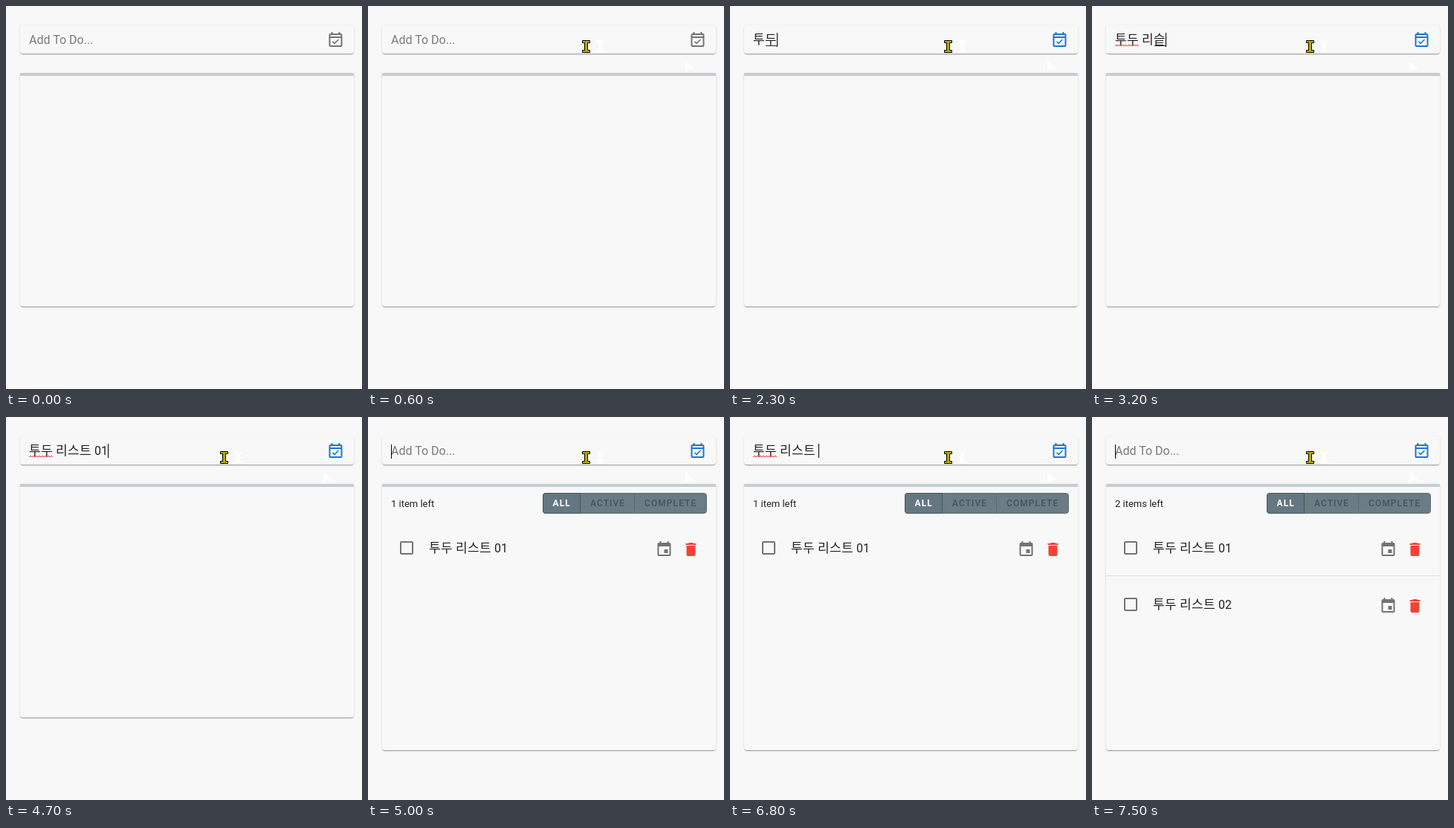
Animation, 479 px wide and 515 px high, one loop 8 s. Source, as an HTML page:

```html
<!DOCTYPE html>
<html lang="ko">
<head>
<meta charset="utf-8">
<title>To Do</title>
<style>
  html, body { margin: 0; width: 100%; height: 100%; overflow: hidden; background: #f8f8f8; }
  .card {
    position: absolute; left: 19px; width: 449px; box-sizing: border-box; border-radius: 4px;
    box-shadow: 0 2px 1px -1px rgba(0,0,0,.2), 0 1px 1px rgba(0,0,0,.14), 0 1px 3px rgba(0,0,0,.12);
    background: #f8f8f8;
  }
  #field { top: 26px; height: 38px; }
  #list { top: 90px; height: 314px; border-top: 4px solid #c6cdd2; border-radius: 0 0 4px 4px; }
  svg { position: absolute; left: 0; top: 0; }
  text { font: 16px Roboto, sans-serif; fill: #222; }
  .hangul { font: 350 17px "Noto Sans CJK KR", "Noto Sans CJK", sans-serif; letter-spacing: .3px; }
  #placeholder { fill: #7a7a7a; }
  #count { font-size: 13px; }
  .tab { font-size: 12px; font-weight: 500; letter-spacing: 1.07px; fill: #46545b; }
  .tab.on { font-weight: 700; fill: #fff; }
  .pointer { fill: #b9aa00; stroke: #000; }
  .trail { fill: #fff; }
</style>
</head>
<body>
<div class="card" id="field"></div>
<div class="card" id="list"></div>
<svg width="479" height="515" viewBox="0 0 479 515">
  <defs>
    <path id="beam" d="M-5 .5h10v3h-3v10h3v3h-10v-3h3v-10h-3z"/>
    <g id="row">
      <rect x="44" y="168" width="16" height="16" rx="1" fill="none" stroke="#737373" stroke-width="2"/>
      <path transform="translate(386.5 166)" fill="#737373" d="M19 19H5V8h14m-3-7v2H8V1H6v2H5c-1.1 0-2 .9-2 2v14a2 2 0 0 0 2 2h14a2 2 0 0 0 2-2V5a2 2 0 0 0-2-2h-1V1m-1 11h-5v5h5z"/>
      <path transform="translate(422.5 166)" fill="#f44336" d="M19 4h-3.5l-1-1h-5l-1 1H5v2h14M6 19a2 2 0 0 0 2 2h8a2 2 0 0 0 2-2V7H6z"/>
    </g>
  </defs>

  <path id="submit" transform="translate(431.5 34)" d="M19 3h-1V1h-2v2H8V1H6v2H5a2 2 0 0 0-2 2v14a2 2 0 0 0 2 2h14a2 2 0 0 0 2-2V5a2 2 0 0 0-2-2m0 16H5V9h14zM5 7V5h14v2zm5.56 10.46 5.93-5.93-1.06-1.06-4.87 4.87-2.11-2.11-1.06 1.06z"/>
  <text id="placeholder" x="31" y="51">Add To Do...</text>
  <g id="typed"></g>
  <path id="squiggle" fill="none" stroke="#f03030"/>
  <rect id="compose" y="53" height="1" fill="#222"/>
  <rect id="caret" width="1" height="19" fill="#000"/>

  <g id="content">
    <text id="count" x="31" y="121"></text>
    <rect x="235.5" y="102.5" width="220" height="27" rx="3.5" fill="#6b7c84" stroke="#5d6d75"/>
    <path d="M358.5 103v26" stroke="#5d6d75"/>
    <path d="M285.5 102.5h-46.5a3.5 3.5 0 0 0-3.5 3.5v20a3.5 3.5 0 0 0 3.5 3.5h46.500z" fill="#657781" stroke="#47575f"/>
    <text class="tab on" x="248.500" y="120">ALL</text>
    <text class="tab" x="299" y="120">ACTIVE</text>
    <text class="tab" x="372" y="120">COMPLETE</text>
    <g id="rows"></g>
  </g>

  <g id="trails" class="trail">
    <path id="arrowTrail" d="M427 74v14l4-3h8z"/>
    <use id="beamTrail" href="#beam" x="312.500" y="46"/>
  </g>
  <path id="arrow" class="pointer" d="M427.500 74.500v16l4-3.500 2.500 5.500 2.500-1-2.500-5.500h5.500z"/>
  <use id="ibeam" class="pointer" href="#beam" y="46"/>
</svg>

<script>
const LOOP = 8000, LEFT = 31;
const $ = id => document.getElementById(id);
const show = (id, on) => { $(id).style.display = on ? '' : 'none'; };
const isHangul = s => /[ㄱ-힣]$/.test(s);
const charWidth = c => c === ' ' ? 4 : isHangul(c) ? 16 : 9;
const measure = s => [...s].reduce((sum, c) => sum + charWidth(c), 0);

// [start, field text, caret visible]
const states = [
  [0, '', 0], [800, '', 1], [1300, '', 0],
  [1800, 'ㅌ', 1], [2000, '투', 1], [2200, '툳', 1], [2300, '투두', 1], [2400, '투두 ', 1],
  [2700, '투두 ㄹ', 1], [2800, '투두 리', 1], [2900, '투두 릿', 1], [3000, '투두 리스', 1],
  [3200, '투두 리슽', 1], [3300, '투두 리스트', 1], [3400, '투두 리스트 ', 1],
  [3900, '투두 리스트 ', 0], [4300, '투두 리스트 ', 1],
  [4600, '투두 리스트 0', 1], [4700, '투두 리스트 01', 1],
  [5000, '', 1], [5500, '', 0],
  [5600, 'ㅌ', 1], [5700, '투', 1], [5800, '툳', 1], [5900, '투두', 1], [6000, '투두 ', 1],
  [6200, '투두 ㄹ', 1], [6300, '투두 리', 1], [6400, '투두 릿', 1], [6500, '투두 리스', 1],
  [6600, '투두 리슽', 1], [6700, '투두 리스트', 1], [6800, '투두 리스트 ', 1],
  [7200, '투두 리스트 02', 1], [7500, '', 1]
];

function words(text, x, y) {
  let offset = 0;
  return text.split(' ').map(word => {
    const kind = isHangul(word) ? ' class="hangul"' : '';
    const tag = `<text${kind} x="${x + offset}" y="${y}">${word}</text>`;
    offset += measure(word + ' ');
    return tag;
  }).join('');
}

function rowsMarkup(count) {
  let markup = '';
  for (let i = 0; i < count; i++) {
    const divider = i ? '<path d="M19 137.500h449" stroke="#dfdfdf"/>' : '';
    markup += `<g transform="translate(0 ${i * 76})">${divider}<use href="#row"/>${words('투두 리스트 0' + (i + 1), 82, 182)}</g>`;
  }
  return markup;
}

function drawField([, text, caretOn]) {
  const end = LEFT + measure(text);
  show('placeholder', !text);
  $('typed').innerHTML = words(text, LEFT, 51);
  show('squiggle', text.startsWith('투두 '));
  show('compose', isHangul(text));
  $('compose').setAttribute('x', end - 15);
  $('compose').setAttribute('width', 15);
  show('caret', caretOn);
  $('caret').setAttribute('x', end);
  $('caret').setAttribute('y', text ? 36 : 37);
}

function drawList(count) {
  show('content', count);
  $('list').style.height = (count ? 358 : 314) + 'px';
  $('count').textContent = count + (count === 1 ? ' item left' : ' items left');
  $('rows').innerHTML = rowsMarkup(count);
}

function drawPointer(t) {
  show('arrow', t >= 300 && t < 400);
  show('ibeam', t >= 400);
  $('ibeam').setAttribute('x', t < 500 ? 312.5 : t < 600 ? 296.5 : 293.5);
  show('arrowTrail', t >= 400);
  show('beamTrail', t >= 500);
}

function drawSubmit(t) {
  const focus = t < 800 ? 0 : t < 900 ? .35 : t < 1000 ? .8 : 1;
  const mix = (a, b) => Math.round(a + (b - a) * focus);
  $('submit').setAttribute('fill', `rgb(${mix(114, 25)},${mix(114, 118)},${mix(114, 210)})`);
}

let lastTick = -1;
function draw(t) {
  const tick = Math.floor(t / 100);
  if (tick === lastTick) return;
  lastTick = tick;
  drawField(states.filter(s => s[0] <= t).pop());
  drawList(t >= 7500 ? 2 : t >= 5000 ? 1 : 0);
  drawPointer(t);
  drawSubmit(t);
}

$('squiggle').setAttribute('d', 'M31 54' + 'l2-2 2 2'.repeat(8));

const start = performance.now();
function frame() {
  draw((performance.now() - start) % LOOP);
  requestAnimationFrame(frame);
}
frame();
</script>
</body>
</html>
```
